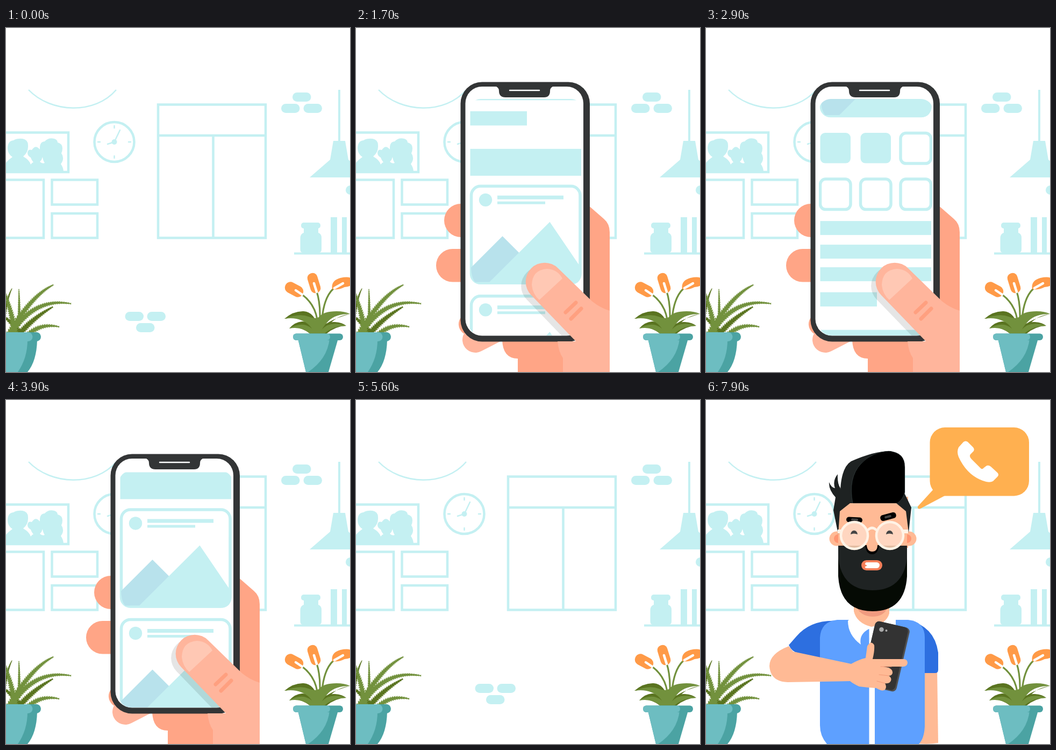
Write an HTML page that moves like this. It is 640x640 px and loops after 8000 ms.

```html
<!DOCTYPE html>
<html lang="en">
<head>
<meta charset="utf-8">
<title>Phone scrolling</title>
<style>
html,body{margin:0;width:100%;height:100%;overflow:hidden;background:#fff}
svg{display:block;width:100vw;height:100vh}
.line{fill:none;stroke:#c4f0f2;stroke-width:4.5}
.pale{fill:#c4f0f2}
.rnd{fill:none;stroke-linecap:round;stroke-linejoin:round}
.skin{fill:#ffba95}
</style>
</head>
<body>
<svg viewBox="0 0 640 640">
<defs>
  <clipPath id="view"><rect x="210" y="132" width="212" height="440" rx="22"/></clipPath>
  <clipPath id="glass"><rect x="203.500" y="109" width="219.500" height="463.500" rx="31"/></clipPath>
  <path id="thumbShape" d="M326 497A35 35 0 0 1 376 447L447 516Q459 523 449 560L410 584Z"/>
  <g id="card">
    <rect x="214.500" y="2.500" width="202.500" height="180" rx="17" class="line" style="stroke-width:5.500"/>
    <circle cx="241" cy="28" r="12.200" class="pale"/>
    <path class="pale" d="M263 20H386V27H263ZM263 31H352V36H263Z"/>
    <path fill="#b8e2ec" d="M272.500 95.500L304 127L250 181H222Q215 175 214 154Z"/>
    <path class="pale" d="M360.500 69L419 155V168Q417 185 400 185H230V181H248Z"/>
  </g>
  <g id="page"></g>
</defs>

<g id="room">
  <path class="line" style="stroke-width:2.500" d="M42 115C84 159 166 161 205 115"/>
  <path class="line" d="M-5 194.500H116V268H-5M-5 282.500H70V390.500H-5M85.500 282.500H170V328.500H85.500ZM85.500 345H170V390.500H85.500ZM283 142.500H483V390.500H283ZM283 200H483M385.500 200V390"/>
  <g class="pale">
    <path d="M-2 268V253Q3 246 12 240Q3 234 3 224Q3 210 14 209Q20 205 31 206Q41 208 41 218Q42 231 32 239Q44 246 46 254Q49 250 51 250Q47 245 46 241Q40 238 40 232Q41 225 48 227Q55 216 63 226V221Q64 211 72 211Q79 203 90 206Q96 208 96 213Q105 215 105 224Q105 229 103 233Q108 240 105 248Q103 252 102 253Q107 260 107 268Z"/>
    <circle cx="201.500" cy="212" r="5"/>
    <path d="M609 210H631L637 245L675 278H565L603 245ZM604 352H616V419H604ZM625 352H634V419H625Z"/>
    <rect x="549" y="362" width="36" height="11" rx="5"/>
    <path d="M554 371H581V381Q587 383 587 390V412Q587 418 581 418H553Q547.500 418 547.500 412V390Q548 383 554 381Z"/>
    <g id="bricks"></g>
  </g>
  <path fill="#fff" d="M63 249Q67 245 68 240Q69 247 72 251Q68 253 63 249Z"/>
  <circle class="line" cx="201.500" cy="212" r="37"/>
  <path class="line rnd" style="stroke-width:2.500" d="M201.500 182V186M201.500 238V242M171 212H175M228 212H232M201.500 212L212 190M201.500 212L189 216"/>
  <path class="line" style="stroke-width:4" d="M620 115V211M536 419.500H640"/>
</g>

<g id="plants">
  <g id="fern"></g>
  <path fill="#4ba3a3" d="M-9 580H58Q57 620 40 640H-9Z"/>
  <path fill="#6dbdc1" d="M-9 580H40Q40 614 22 640H-9Z"/>
  <rect x="-20" y="566" width="85" height="17" rx="8.500" fill="#4ba3a3"/>
  <rect x="-20" y="566" width="69.500" height="17" rx="8.500" fill="#6dbdc1"/>

  <path class="rnd" stroke="#72913d" stroke-width="3.200" d="M551 496Q574 513 579 542M578 490Q585 512 584 542M609 485Q591 502 588 542"/>
  <g fill="#ff9a47">
    <rect x="518" y="476" width="36" height="21" rx="10" transform="rotate(28 536 486.500)"/>
    <rect x="563.500" y="455.500" width="19" height="38" rx="9" transform="rotate(-17 573 474.500)"/>
    <path d="M607 486Q604 470 622 465Q645 460 646 472Q645 481 630 482Q618 488 607 486Z"/>
  </g>
  <path class="rnd" stroke="#fff" stroke-width="4.500" d="M539 488L551 496M573 475L578 491M611 484L627 475"/>
  <g fill="#5a7420">
    <path d="M518 541Q535 526 554 527Q574 528 582 560H572Q560 534 518 541ZM584 564Q592 545 640 532Q616 535 601 552L590 566Z"/>
    <path d="M576 569Q567 546 551 546Q537 547 527 559Q545 553 566 569ZM580 569Q588 546 612 547Q626 548 633 554Q612 555 596 569Z"/>
  </g>
  <g fill="#72913d">
    <path d="M518 541Q546 530 563 537Q575 542 582 538Q590 527 615 527Q630 527 640 532Q613 532 600 545Q589 556 584 569H573Q568 551 550 544Q536 538 518 541Z"/>
    <path d="M527 559Q545 549 558 553Q570 557 577 569H566Q551 555 527 559ZM633 554Q613 547 598 553Q588 558 582 569H592Q606 555 633 554Z"/>
  </g>
  <path fill="#4ba3a3" d="M543 578H618L600 640H558Z"/>
  <path fill="#6dbdc1" d="M543 578H602Q598 616 562 640H558Z"/>
  <rect x="534" y="568.500" width="93" height="12.500" rx="6" fill="#4ba3a3"/>
  <rect x="534" y="568.500" width="69" height="12.500" rx="6" fill="#6dbdc1"/>
</g>

<g id="hand">
  <g fill="#ffa586">
    <rect x="164" y="327" width="90" height="62" rx="31"/>
    <rect x="149" y="411" width="90" height="61.500" rx="30.700"/>
    <path d="M430 328L461 355Q472 364 472 380V592H430ZM272 580Q273 615 301 615V640H400V580Z"/>
  </g>
  <path class="rnd" stroke="#ffa586" stroke-width="42" d="M212 551L240 560"/>
  <path class="rnd" stroke="#ffb59c" stroke-width="48" d="M222 580L290 545"/>
  <rect x="194.500" y="100.500" width="240.500" height="483" rx="40" fill="#333536"/>
  <rect x="203.500" y="109" width="219.500" height="463.500" rx="31" fill="#fff"/>
  <g clip-path="url(#view)"><g clip-path="url(#glass)">
    <g id="feed"><use href="#page"/><use href="#page" y="-852"/><use href="#page" y="852"/></g>
  </g></g>
  <path fill="#333536" d="M258 108H369Q361 110 361 117Q361 129 350 129H278Q266 129 266 117Q266 110 258 108Z"/>
  <path class="rnd" stroke="#fff" stroke-width="2.500" d="M286 116H341"/>
  <g clip-path="url(#glass)"><g id="shade"><use href="#thumbShape" x="-8.500" y="8" opacity=".1"/></g></g>
  <path fill="#ffb59c" d="M375 583H410L400 560L440 509Q455 521 472 526V640H385V614Q377 603 375 583Z"/>
  <g id="thumb">
    <use href="#thumbShape" fill="#ffb59c"/>
    <path fill="#ffc8b4" d="M341 506L384 466Q375 449 355 448Q328 450 327 478Q329 496 341 506Z"/>
    <path class="rnd" stroke="#ffa080" stroke-width="7" d="M390 529L409 511M400 541L419 522"/>
  </g>
</g>

<g id="man">
  <path class="skin" d="M407 500H430L432 638Q414 641 394 639Z"/>
  <path fill="#2d6fe0" d="M375 410Q425 420 432 470V502Q432 508 426 508H400Z"/>
  <path fill="#2d6fe0" d="M245 411Q195 408 168 440L154 456Q160 469 172 471L220 481Z"/>
  <path fill="#5ea0ff" d="M244 409H376Q407 412 407 442V607Q406 630 396 640H225Q212 625 212 605V442Q214 412 244 409Z"/>
  <path fill="#fff" d="M303.500 422H314V640H303.500ZM264 411L277 396L312 420L342 397L353 409V422L316 424L303 426Q284 436 288 455Q264 437 264 411Z"/>
  <path class="skin" d="M275 380H341V397Q336 416 308 422Q280 415 275 393Z"/>
  <path fill="#f09b80" d="M280 385H338Q332 403 309 403Q288 402 280 385Z"/>
  <g class="skin"><circle cx="243" cy="258" r="13.500"/><circle cx="378" cy="258" r="13.500"/><path d="M246 180H376V275H246Z"/></g>
  <path fill="#ff9672" d="M246 250A8 8 0 0 0 246 266ZM374 250A8 8 0 0 1 374 266Z"/>
  <g fill="#1e2222">
    <path d="M250 195Q247 128 270 114Q315 94 345 95L350 192H268L249 207L246 250L237 205L241 181Q228 167 229 153Q233 163 240 164Q235 150 245 138Q244 155 250 164Z"/>
    <path d="M354 192L369 173L382 200L377 247L372 207Z"/>
  </g>
  <path d="M273 192Q264 145 288 119Q308 97 340 95Q370 97 370 125V172Q366 185 356 192Z" stroke="#566" stroke-width=".4"/>
  <path fill="#050a04" d="M246 271H374V328Q370 393 310 393Q250 393 246 328Z"/>
  <path fill="#1f2323" d="M246 271H374V295Q366 354 310 354Q254 354 246 295Z"/>
  <g transform="rotate(3 276 223)"><rect x="261" y="218" width="30" height="10" rx="5"/><rect x="270" y="220.500" width="13" height="4" rx="2" fill="#444"/></g>
  <g transform="rotate(-15 339 217)"><rect x="324" y="211.500" width="30" height="11" rx="5"/><rect x="332" y="215" width="13" height="4" rx="2" fill="#444"/></g>
  <path d="M296 270Q298 287 309 287Q320 287 322 270Z"/>
  <path class="skin" d="M299 245V270Q300 282 309 282Q319 282 319 270V245Z"/>
  <g id="lenses"></g>
  <path class="rnd" stroke="#fff3e6" stroke-width="4.500" d="M301 242Q309 234 317 242"/>
  <path fill="#fff3e6" d="M245 241H253V248H245ZM367 241H376V248H367Z"/>
  <rect x="289" y="298" width="39" height="19" rx="9.500" fill="#f47f5a"/>
  <path fill="#fff" d="M299 302H318Q323 303 323 307.500Q322 313 317 313H300Q295 313 296 310L300 308L296 306Q296 302 299 302Z"/>
  <g id="arm">
    <g transform="rotate(13 334.500 477)">
      <rect x="301.500" y="416" width="66" height="122" rx="8" fill="#505050"/>
      <rect x="301.500" y="416" width="63" height="120" rx="8" fill="#333"/>
    </g>
    <circle cx="326.500" cy="427" r="4.300" fill="#aaa"/><circle cx="335.500" cy="429" r="2" fill="#aaa"/>
    <path class="skin" d="M154 458L162 468L270 491Q284 483 297 480L300 458Q307 446 313 456Q314 466 310 482H368Q375 483 375 489Q374 496 367 496H330L340 498Q348 502 347 508Q346 513 340 513Q347 518 343 524Q340 528 333 527Q337 534 333 539Q328 543 317 536Q300 535 285 533Q274 528 268 523L152 525Q120 524 118 495Q118 472 154 458Z"/>
    <path class="rnd" stroke="#f39a78" stroke-width="1" d="M325 496H345M322 511L340 513M318 523L333 527"/>
  </g>
</g>

<g id="bubble">
  <path fill="#ffb050" d="M426 163L394 198Q393 204 399 202L450 175Z"/>
  <rect x="416.500" y="51" width="184.500" height="127.500" rx="28" fill="#ffb050"/>
  <g id="face">
    <circle cx="508.500" cy="113" r="36.700" fill="#fff"/>
    <path class="rnd" stroke="#3a2c10" stroke-width="5" d="M491.500 101V110M525 101V110"/>
    <path class="rnd" stroke="#3a2c10" stroke-width="4" d="M495 128Q500 117.500 508.500 117.500Q517 117.500 522 128"/>
  </g>
  <path id="call" fill="#fff" d="M479 78Q483 75 487 78L497 88Q501 93 496 97L492 101Q489 105 494 110L511 127Q514 130 517 126L521 123Q525 120 530 124L542 135Q546 139 542 143L534 151Q529 154 521 152Q487 143 470 106Q466 96 470 88Z"/>
</g>
</svg>
<script>
const LOOP = 8000, PAGE = 852, REST = 22, SWIPE_AT = 1250, SWIPE = 2100;
const $ = id => document.getElementById(id);
const clamp = v => Math.max(0, Math.min(1, v));
const span = (t, a, b) => clamp((t - a) / (b - a));
const easeOut = p => 1 - (1 - p) ** 3;
const show = (id, on) => { $(id).style.display = on ? '' : 'none'; };
const place = (id, s) => $(id).setAttribute('transform', s);
const scaleAt = (x, y, k) => `translate(${x} ${y}) scale(${k}) translate(${-x} ${-y})`;

// Same shape as cubic-bezier(.2, 0, .2, 1)
function glide(x) {
  let lo = 0, hi = 1;
  for (let i = 0; i < 24; i++) {
    const m = (lo + hi) / 2;
    if (.6 * m * (1 - m) + m ** 3 < x) lo = m; else hi = m;
  }
  return lo * lo * (3 - 2 * lo);
}

// Leaf outline with forward-leaning teeth along a quadratic curve
function frond(x0, y0, cx, cy, x1, y1, w, color) {
  const n = Math.round(Math.hypot(x1 - x0, y1 - y0) / 4);
  const left = [], right = [];
  for (let i = 0; i <= n * 2; i++) {
    const p = i / (n * 2), q = 1 - p;
    const x = q * q * x0 + 2 * p * q * cx + p * p * x1;
    const y = q * q * y0 + 2 * p * q * cy + p * p * y1;
    const a = Math.atan2(q * (cy - y0) + p * (y1 - cy), q * (cx - x0) + p * (x1 - cx));
    const tip = i % 2, r = w * (1 - .8 * p * p) * (tip ? 1 : .5), f = tip ? 3 : 0;
    const px = x + f * Math.cos(a), py = y + f * Math.sin(a);
    left.push([px - r * Math.sin(a), py + r * Math.cos(a)]);
    right.unshift([px + r * Math.sin(a), py - r * Math.cos(a)]);
  }
  const pts = left.concat(right).map(v => v.map(c => c.toFixed(1)).join()).join(' ');
  return `<polygon points="${pts}" fill="${color}"/>`;
}

const GREEN = '#72913d', DARK = '#5a7420';
$('fern').innerHTML = [
  [-4, 550, 0, 505, 11, 485, 3, DARK],
  [18, 578, 45, 542, 87, 519, 7, DARK],
  [32, 578, 20, 555, -6, 535, 7, DARK],
  [24, 555, 25, 520, 24, 486, 3.5, GREEN],
  [18, 578, 12, 530, -4, 488, 7, GREEN],
  [4, 572, 46, 498, 88, 478, 6.5, GREEN],
  [6, 574, 50, 500, 121, 513, 6.5, GREEN],
  [34, 578, 60, 547, 99, 556, 6, GREEN]
].map(a => frond(...a)).join('');

$('bricks').innerHTML = [[533, 120], [512, 141], [553.5, 141], [221.5, 528], [262.5, 528], [242, 549], [632, 293]]
  .map(([x, y]) => `<rect x="${x}" y="${y}" width="34.500" height="17" rx="8.500"/>`).join('');

$('lenses').innerHTML = [276, 342].map(x => `
  <circle cx="${x}" cy="252" r="25" fill="#fff" fill-opacity=".4"/>
  <path d="M${x - 17} 271H${x + 17}Q${x} 283 ${x - 17} 271Z" fill="#f5c8a8" fill-opacity=".85"/>
  <path d="M${x - 7} 250A6.300 7 0 0 1 ${x + 6} 250Q${x - 1} 247 ${x - 7} 250Z" fill="#454545"/>
  <circle cx="${x}" cy="252" r="25" fill="none" stroke="#fff3e6" stroke-width="4.500"/>`).join('');

const block = (x, y, w, h, r) => `<rect class="pale" x="${x}" y="${y}" width="${w}" height="${h}" rx="${r || 0}"/>`;
const tile = (x, y) => `<rect class="line" style="stroke-width:5.500" x="${x}" y="${y}" width="56.500" height="56.500" rx="10"/>`;
$('page').innerHTML =
  block(212.5, 194, 56.5, 56.5, 9) + block(287.5, 194, 56.5, 56.5, 9) + tile(362, 194.5) +
  [212.5, 287.5, 362].map(x => tile(x, 280)).join('') +
  [358, 402, 444].map(y => block(212.5, y, 206.5, 26)).join('') +
  block(212.5, 490.5, 105.5, 26.5) + block(212.5, 560.5, 206.5, 50) +
  '<use href="#card" y="627.500"/><use href="#card" y="832"/>';

function draw(t) {
  show('hand', t >= 850 && t < 5600);
  const away = 1 - span(t, 850, 1000) + span(t, 5450, 5600);
  place('hand', `translate(${-400 * away} ${540 * away})`);

  const u = t < SWIPE_AT ? 0 : (t - SWIPE_AT) % SWIPE;
  const s = (REST + PAGE * glide(u / SWIPE)) % PAGE;
  place('feed', `translate(0 ${-s})`);
  const turn = `rotate(${9 * Math.sin(Math.PI * clamp(u / 400))} 430 550)`;
  place('thumb', turn);
  place('shade', turn);

  show('man', t >= 5750);
  place('man', `translate(0 ${560 * (1 - easeOut(span(t, 5750, 6150)))})`);
  place('arm', `rotate(${13 * (1 - easeOut(span(t, 5950, 6400)))} 200 440)`);

  show('bubble', t > 6100);
  place('bubble', scaleAt(396, 201, easeOut(span(t, 6100, 6400))));
  const gone = span(t, 7050, 7200);
  show('face', gone < 1);
  place('face', scaleAt(508.5, 113, 1 - gone));
  show('call', t > 7550);
  place('call', `rotate(${18 * (1 - span(t, 7600, 7900))} 506 114) ` +
    scaleAt(506, 114, easeOut(span(t, 7550, 7800))));
}

const start = performance.now();
function tick() {
  draw((performance.now() - start) % LOOP);
  requestAnimationFrame(tick);
}
tick();
</script>
</body>
</html>
```
